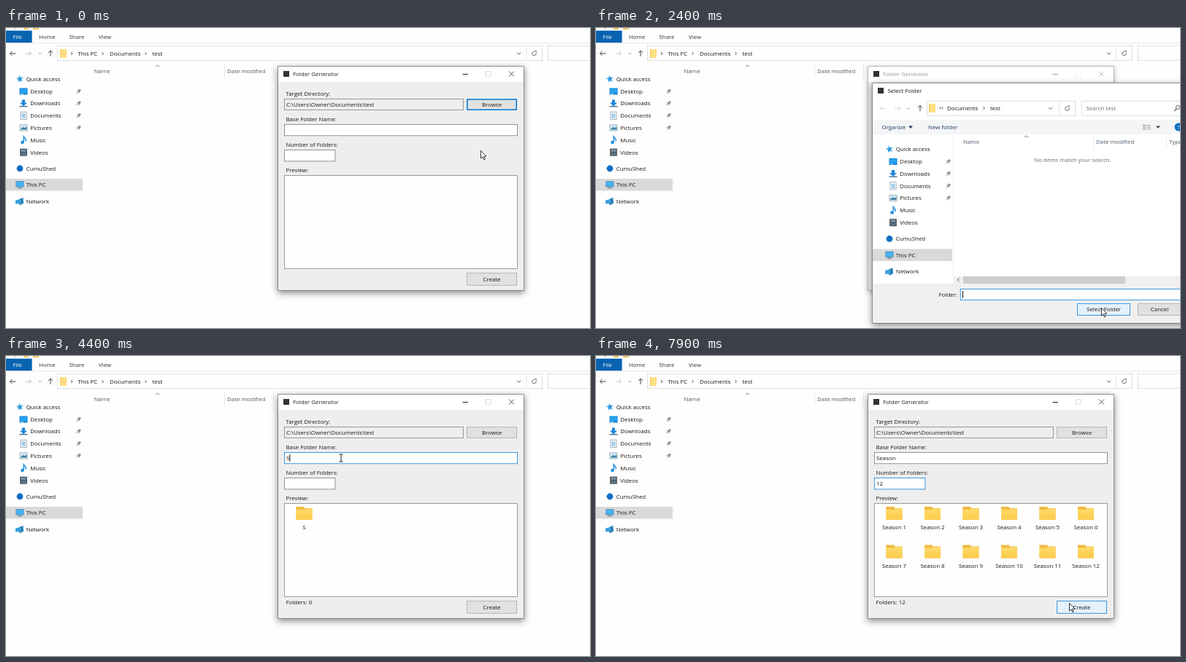
These frames come from a looping animation (800 px wide and 412 px high, 8 s). An HTML page with a canvas:

```html
<!DOCTYPE html>
<html lang="en">
<head>
<meta charset="utf-8">
<title>Folder Generator</title>
<style>
html, body { margin: 0; width: 100%; height: 100%; overflow: hidden; background: #fefefe; }
canvas { display: block; width: 800px; height: 412px; }
</style>
</head>
<body>
<canvas id="stage" width="800" height="412"></canvas>
<script>
const g = document.getElementById('stage').getContext('2d');
const LOOP = 8000;
const HAIR = 0.75; // the desktop is shown scaled down, so a one-pixel line is thinner here
const INK = '#161616', BLUE = '#0078d7', FACE = '#efeeee', WHITE = '#fefefe';
const T = { press: 750, open: 1100, close: 2600, focusName: 4100, focusCount: 6100, one: 6700, two: 7000 };
const LETTERS = [4300, 4600, 4800, 5000, 5200, 5500];

// Drawing helpers
function fill(x, y, w, h, color) {
  g.fillStyle = color;
  g.fillRect(x, y, w, h);
}

function box(x, y, w, h, bg, border, line = HAIR) {
  fill(x, y, w, h, border);
  fill(x + line, y + line, w - 2 * line, h - 2 * line, bg);
}

function text(s, x, y, color = INK, align = 'left') {
  g.font = '7.9px "Open Sans", "Noto Sans", sans-serif';
  g.textAlign = align;
  g.fillStyle = color;
  g.fillText(s, x, y);
}

function lines(points, color, width = 1, close = false) {
  g.beginPath();
  points.forEach(([x, y]) => g.lineTo(x, y));
  if (close) g.closePath();
  g.strokeStyle = color;
  g.lineWidth = width;
  g.stroke();
}

function poly(points, color) {
  g.beginPath();
  points.forEach(([x, y]) => g.lineTo(x, y));
  g.fillStyle = color;
  g.fill();
}

function disc(x, y, r, color) {
  g.beginPath();
  g.arc(x, y, r, 0, 7);
  g.fillStyle = color;
  g.fill();
}

function arc(x, y, r, from, to, color, width = 1) {
  g.beginPath();
  g.arc(x, y, r, from, to);
  g.strokeStyle = color;
  g.lineWidth = width;
  g.stroke();
}

function chevron(x, y, angle, size = 2, color = '#555') {
  g.save();
  g.translate(x, y);
  g.rotate(angle);
  lines([[-size / 2, -size], [size / 2, 0], [-size / 2, size]], color);
  g.restore();
}
const RIGHT = 0, DOWN = Math.PI / 2, UP = -Math.PI / 2;

function arrow(x, y, angle, color) {
  g.save();
  g.translate(x, y);
  g.rotate(angle);
  lines([[-4, 0], [4, 0]], color);
  lines([[1, -3], [4, 0], [1, 3]], color);
  g.restore();
}

function refresh(x, y) {
  arc(x, y + 0.3, 2.7, -0.3, 4.9, '#666');
  poly([[x + 0.3, y - 3.8], [x + 3.2, y - 3.8], [x + 3.2, y - 0.9]], '#666');
}

function smallFolder(x, y) {
  fill(x, y, 8, 12, '#f8cf68');
  fill(x + 2, y, 7, 12, '#ffdf83');
}

function windowFrame(x, y, w, h, active) {
  g.save();
  g.shadowColor = active ? 'rgba(0,0,0,.46)' : 'rgba(0,0,0,.25)';
  g.shadowBlur = active ? 9 : 7;
  g.shadowOffsetY = active ? 3 : 2;
  const edge = 1 - HAIR;
  fill(x + edge, y + edge, w - 2 * edge, h - 2 * edge, active ? '#777' : '#aaa');
  g.restore();
}

function button(label, x, y, w, h, state) {
  const hot = state === 'hover';
  box(x, y, w, h, hot ? '#e5f1fb' : '#e1e1e1', state ? BLUE : '#a6a6a6', state === 'focus' ? 2 * HAIR : HAIR);
  text(label, x + w / 2, y + h / 2 + 2.8, INK, 'center');
}

function caret(x, y, on) {
  if (on) fill(x, y, 1, 10, '#111');
}

// Navigation icons, each centred on (x, y)
const icons = {
  star(x, y) {
    const pts = Array.from({ length: 10 }, (_, i) => {
      const a = i * Math.PI / 5 - 1.75, r = i % 2 ? 2.2 : 5.2;
      return [x + r * Math.cos(a), y + r * Math.sin(a)];
    });
    poly(pts, '#2b9be0');
  },
  desktop(x, y) {
    fill(x - 5.5, y - 4.5, 11, 9, '#1283d8');
    fill(x - 4.5, y - 3.5, 9, 5.5, '#27a3ee');
    fill(x - 4, y + 2.8, 4, 1, '#b9e2fa');
  },
  downloads(x, y) {
    fill(x - 2, y - 5, 4, 5, '#1c86dc');
    poly([[x - 5, y - 1], [x + 5, y - 1], [x, y + 4]], '#1c86dc');
    fill(x - 5.5, y + 3.5, 11, 1.5, '#4d7da5');
  },
  page(x, y) {
    box(x - 4.5, y - 5.5, 9, 11, '#f5f9fc', '#8b9eae');
    for (let i = 0; i < 3; i++) fill(x - 2.5, y - 2.5 + 2.2 * i, 5, 1, '#4d9ace');
  },
  picture(x, y) {
    box(x - 5.5, y - 4.5, 11, 9, '#cfe8f6', '#9aa8b3');
    poly([[x - 4.5, y + 2.5], [x - 1, y - 1], [x + 1, y], [x + 4.5, y - 1], [x + 4.5, y + 2.5]], '#3e7f9f');
  },
  music(x, y) {
    disc(x - 1.5, y + 3, 2.3, '#1b8ee4');
    lines([[x + 0.2, y + 3], [x + 0.2, y - 5], [x + 3.5, y - 0.5], [x + 2.6, y + 1.5]], '#1b8ee4', 1.4);
  },
  video(x, y) {
    fill(x - 5, y - 5, 10, 10, '#3c4349');
    fill(x - 3, y - 4, 6, 3.5, '#7795a8');
    fill(x - 3, y + 0.5, 6, 3.5, '#58788d');
    for (let i = 0; i < 4; i++) {
      fill(x - 4.5, y - 4 + 2.4 * i, 1, 1, '#ddd');
      fill(x + 3.5, y - 4 + 2.4 * i, 1, 1, '#ddd');
    }
  },
  dot(x, y) { disc(x, y, 4.4, '#0d6fc4'); },
  pc(x, y) {
    box(x - 5.5, y - 5, 11, 8, '#45b6f3', '#3f7fa5');
    fill(x - 1, y + 3, 2, 1.5, '#5a7f95');
    fill(x - 3.5, y + 4, 7, 1, '#5a7f95');
  },
  network(x, y) {
    poly([[x - 1, y - 3], [x + 4.5, y - 5], [x + 5, y + 3], [x - 1, y + 4.5]], '#2a7db8');
    poly([[x - 6, y - 1.5], [x + 1.5, y - 3], [x + 1.5, y + 3], [x - 6, y + 3.5]], '#3d9fdc');
    disc(x + 1, y + 3.2, 1.9, '#2f8cc8');
  }
};

const NAV = [
  ['star', 'Quick access', 70], ['desktop', 'Desktop', 87, 1, 1], ['downloads', 'Downloads', 103.5, 1, 1],
  ['page', 'Documents', 120.3, 1, 1], ['picture', 'Pictures', 137, 1, 1], ['music', 'Music', 154, 1],
  ['video', 'Videos', 170.7, 1], ['dot', 'CumuShed', 193], ['pc', 'This PC', 215.3], ['network', 'Network', 238]
];

function pin(x, y) {
  g.save();
  g.translate(x, y);
  g.rotate(0.75);
  fill(-1.5, -3.5, 3, 4, '#8a9197');
  fill(-2.7, 0, 5.4, 1, '#8a9197');
  fill(-0.4, 1, 0.9, 3, '#8a9197');
  g.restore();
}

function navigation(dx, dy, left) {
  fill(left, 207 + dy, 105 + dx - left, 16.5, '#d9d9d9');
  for (const [icon, label, y, nested, pinned] of NAV) {
    icons[icon](dx + (nested ? 24 : 19), y + dy);
    text(label, dx + (nested ? 33.3 : 27.7), y + dy + 2.8);
    if (pinned) pin(dx + 99.5, y + dy);
  }
}

function explorer() {
  fill(0, 0, 800, 412, WHITE);
  fill(12, 0, 1, 2, '#aaa');
  fill(24, 0, 7, 2, '#efc65c');
  fill(37, 0, 8, 2, '#efc65c');
  fill(0, 3.6, 35.6, 16.7, '#0863b1');
  text('File', 9.5, 15.3, '#fff');
  text('Home', 45, 15.3, '#333');
  text('Share', 86.5, 15.3, '#333');
  text('View', 127, 15.3, '#333');
  fill(0, 20.3, 800, HAIR, '#e3e3e3');

  arrow(9.5, 35, Math.PI, '#444');
  arrow(30.5, 35, 0, '#c4c4c4');
  chevron(46.5, 35, DOWN, 1.6, '#888');
  arrow(61, 35, UP, '#444');
  box(70, 24, 665, 21, WHITE, '#d5d5d5');
  smallFolder(74, 29);
  [90, 132.5, 191.5].forEach(x => chevron(x, 35, RIGHT));
  text('This PC', 98.5, 38);
  text('Documents', 142, 38);
  text('test', 200.5, 38);
  chevron(702.5, 35, DOWN, 2.5);
  fill(712, 25, HAIR, 19, '#dedede');
  refresh(723.5, 35);
  box(742, 24, 70, 21, WHITE, '#d5d5d5');

  fill(106, 50, HAIR, 362, '#f7f7f7');
  text('Name', 120.5, 62, '#4a5a6a');
  chevron(207.5, 52, UP, 2.5, '#777');
  text('Date modified', 303, 62, '#4a5a6a');
  [299, 366].forEach(x => fill(x, 50, HAIR, 18, '#e2e2e2'));
  navigation(0, 0, 0);
}

function folder(x, y) {
  fill(x - 11, y, 11, 5, '#f0b83c');
  fill(x - 11, y + 2, 22, 16, '#f0bd45');
  const shade = g.createLinearGradient(0, y + 3, 0, y + 18);
  shade.addColorStop(0, '#ffda6c');
  shade.addColorStop(1, '#fccb48');
  poly([[x - 11, y + 4], [x, y + 4], [x + 2, y + 2.7], [x + 11, y + 2.7], [x + 11, y + 18], [x - 11, y + 18]], shade);
}

function generator(s) {
  windowFrame(372, 52, 338, 309, s.active);
  fill(373, 53, 336, 307, FACE);
  fill(373, 53, 336, 21, '#fff');
  const ink = s.active ? '#222' : '#999';
  fill(380, 59, 8, 8, '#333');
  text('Folder Generator', 393, 66, ink);
  lines([[625.5, 63.5], [633, 63.5]], ink);
  lines([[657.5, 59.5], [664, 59.5], [664, 66], [657.5, 66]], s.active ? '#d0d0d0' : '#ececec', HAIR, true);
  lines([[689, 59.5], [696, 66.5]], ink, HAIR);
  lines([[696, 59.5], [689, 66.5]], ink, HAIR);

  text('Target Directory:', 383.5, 93);
  box(381, 97, 245.7, 16, FACE, '#7a7a7a');
  text('C:\\Users\\Owner\\Documents\\test', 384, 107.8);
  button('Browse', 631, 97.3, 69, 15.7, s.browse);

  text('Base Folder Name:', 383.5, 128);
  box(381, 132, 319.8, 16.2, '#fff', s.focus === 'name' ? BLUE : '#707070');
  text(s.name, 384, 143);
  text('Number of Folders:', 383.5, 163);
  box(381, 167, 70.3, 16.3, '#fff', s.focus === 'count' ? BLUE : '#707070');
  text(s.count, 384, 178);
  if (s.focus === 'name') caret(384 + g.measureText(s.name).width, 135, s.blink);
  if (s.focus === 'count') caret(384 + g.measureText(s.count).width, 170, s.blink);

  text('Preview:', 383.5, 198);
  box(381, 202.2, 319.8, 128.8, WHITE, '#808080');
  if (s.name) {
    const total = Number(s.count);
    for (let i = 0; i < Math.max(1, total); i++) {
      const x = 408.5 + 52.5 * (i % 6), y = 207 + 52.5 * Math.floor(i / 6);
      folder(x, y);
      text(total ? `${s.name} ${i + 1}` : s.name, x, y + 31, INK, 'center');
    }
    text('Folders: ' + total, 383.5, 341);
  }
  button('Create', 631, 336.3, 69, 17.4, s.create);
}

function folderPicker(t) {
  windowFrame(378, 75, 440, 331, true);
  fill(379, 76, 421, 329, '#fff');
  fill(386, 82, 8, 8, '#333');
  text('Select Folder', 399.5, 88.5);

  arrow(393, 110.5, Math.PI, '#d4d4d4');
  arrow(413, 110.5, 0, '#d4d4d4');
  chevron(428, 110.5, DOWN, 1.6, '#888');
  arrow(444, 110.5, UP, '#444');
  box(453, 100, 204, 21, '#fff', '#d5d5d5');
  smallFolder(456, 104);
  chevron(471.5, 110, Math.PI, 1.6);
  chevron(474.5, 110, Math.PI, 1.6);
  text('Documents', 481, 113);
  chevron(531.5, 110, RIGHT);
  text('test', 540, 113);
  chevron(622.5, 110.5, DOWN, 2.5);
  fill(634, 101, HAIR, 19, '#dedede');
  refresh(645.5, 110.5);
  box(665, 100, 150, 21, '#fff', '#d5d5d5');
  text('Search test', 671.5, 113, '#707070');
  arc(797, 109, 2.6, 0, 7, '#666');
  lines([[795, 111], [792, 114]], '#666', 1.3);

  fill(379, 126, 421, 20, '#f4f5f6');
  text('Organize', 391.5, 138.8, '#1e3960');
  poly([[428, 134.5], [434, 134.5], [431, 138]], '#1e3960');
  text('New folder', 455, 138.8, '#1e3960');
  for (let i = 0; i < 3; i++) {
    fill(749, 133 + 2.5 * i, 4, 1.3, '#999');
    fill(754, 133 + 2.5 * i, 6, 1.3, '#b5b5b5');
  }
  poly([[767, 134.5], [773, 134.5], [770, 138]], '#444');
  disc(798, 136, 5.5, '#0a6fc2');
  text('?', 798, 139, '#fff', 'center');

  navigation(383, 96.5, 379);
  fill(488, 147, 3, 204, '#fafafa');
  text('Name', 503, 159, '#4a5a6a');
  chevron(589.5, 149, UP, 2.5, '#777');
  text('Date modified', 685, 159, '#4a5a6a');
  text('Type', 785, 159, '#4a5a6a');
  [681, 781].forEach(x => fill(x, 147, HAIR, 18, '#e2e2e2'));
  text('No items match your search.', 653, 183.5, '#6d6d6d', 'center');

  fill(491, 341, 309, 10, '#f0f0f0');
  fill(503, 341, 222, 10, '#cdcdcd');
  chevron(496.5, 346, Math.PI, 2.5);
  fill(379, 351, 421, 54, '#f0f0f0');
  text('Folder:', 495, 369.3, INK, 'right');
  box(498.8, 358, 330, 16, '#fff', BLUE);
  caret(502, 361, (t - T.open) % 1060 < 530);
  button('Select Folder', 659, 378.3, 73, 16.7, t > 2350 ? 'hover' : 'focus');
  button('Cancel', 742, 378.3, 60, 16.7);
}

// Pointer: [time, x, y] stops joined with eased motion
const PATH = [
  [0, 650, 168], [200, 650, 168], [650, 657, 109], [1100, 657, 109], [1450, 651, 205], [1600, 651, 205],
  [2350, 692, 384], [2700, 690, 385], [3000, 685, 388], [3200, 685, 388], [4000, 459, 140],
  [5600, 459, 140], [6050, 421, 174], [7100, 421, 174], [7700, 648, 339], [8000, 648, 339]
];

function pointerAt(t) {
  const i = PATH.findIndex(p => p[0] > t);
  const [t0, x0, y0] = PATH[i - 1], [t1, x1, y1] = PATH[i];
  const u = (t - t0) / (t1 - t0), e = u * u * (3 - 2 * u);
  return [x0 + (x1 - x0) * e, y0 + (y1 - y0) * e];
}

function inside([x, y], left, top, right, bottom) {
  return x >= left && x <= right && y >= top && y <= bottom;
}

function pointer(t, [x, y], dialog) {
  if (t >= 4600 && t < 5600 || t >= T.one && t < 7100) return;
  if (t >= T.press && t < 1250) {
    const a = t / 160;
    arc(x, y, 5, 0, 7, '#1d7bc4', 3);
    arc(x, y, 5, a, a + 1.4, '#67bdec', 3);
    return;
  }
  const p = [x, y];
  if (!dialog && (inside(p, 381, 132, 700, 148) || inside(p, 381, 167, 451, 183))) {
    lines([[x, y - 5], [x, y + 5]], '#222');
    [-5, 5].forEach(d => lines([[x - 2.5, y + d], [x + 2.5, y + d]], '#222'));
    return;
  }
  g.save();
  g.translate(x, y);
  const shape = [[0.5, 0.5], [0.5, 11], [3, 8.8], [4.7, 12.8], [6.3, 12], [4.6, 8.2], [8, 8]];
  poly(shape, '#fff');
  lines(shape, '#222', 0.9, true);
  g.restore();
}

function render(t) {
  const p = pointerAt(t);
  const dialog = t >= T.open && t < T.close;
  const focus = t >= T.focusCount ? 'count' : t >= T.focusName ? 'name' : 'browse';
  const keys = [T.focusName, ...LETTERS, T.focusCount, T.one, T.two];
  const lastKey = keys.filter(k => k <= t).pop() || 0;
  const overBrowse = !dialog && inside(p, 631, 97, 700, 113);

  explorer();
  generator({
    active: t < T.press || t >= T.close,
    focus,
    name: 'Season'.slice(0, LETTERS.filter(k => k <= t).length),
    count: t >= T.two ? '12' : t >= T.one ? '1' : '',
    blink: (t - lastKey) % 1060 < 530 && t < 7850,
    browse: overBrowse ? 'hover' : focus === 'browse' ? 'focus' : '',
    create: inside(p, 631, 336, 700, 354) ? 'hover' : ''
  });
  if (dialog) folderPicker(t);
  pointer(t, p, dialog);
}

function tick(now) {
  render(now % LOOP);
  requestAnimationFrame(tick);
}
requestAnimationFrame(tick);
</script>
</body>
</html>
```
